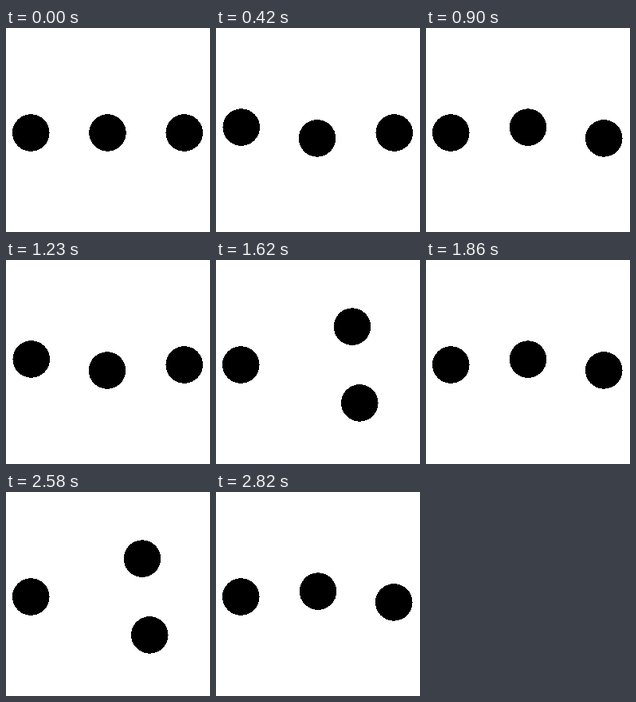
An HTML page that plays this animation: 256x256 px, repeating every 2850 ms.

```html
<!DOCTYPE html>
<html lang="en">
<head>
<meta charset="utf-8">
<title>Swapping dots</title>
<style>
  html, body { margin: 0; width: 100%; height: 100%; overflow: hidden; background: #fff; }
  svg { display: block; width: 100vw; height: 100vh; }
</style>
</head>
<body>
<svg viewBox="0 0 256 256" shape-rendering="crispEdges">
  <circle r="23.3"/>
  <circle r="23.3"/>
  <circle r="23.3"/>
</svg>
<script>
  const STEP = 30, LOOP = 2850, SWAP = 16;
  const MID = 127.5, CY = 131.5, GAP = 96.25, RADIUS = GAP / 2;
  const dots = document.querySelectorAll('circle');

  const bezier = (a, b, s) =>
    3 * (1 - s) * (1 - s) * s * a + 3 * (1 - s) * s * s * b + s * s * s;

  // Slow start, quick swing, then settle back from a small overshoot.
  function ease(u) {
    let lo = 0, hi = 1;
    for (let i = 0; i < 30; i++) {
      const s = (lo + hi) / 2;
      if (bezier(0.716, 0.075, s) < u) lo = s; else hi = s;
    }
    return bezier(0.25, 1.385, lo);
  }

  function place(dot, x, y) {
    dot.setAttribute('cx', x);
    dot.setAttribute('cy', y);
  }

  function draw(ms) {
    const tick = Math.floor((ms % LOOP) / STEP);
    const phase = tick % SWAP;
    const side = Math.floor(tick / SWAP) % 2 ? 1 : -1;
    const angle = phase ? Math.PI * ease(phase / SWAP) : 0;
    const cx = MID + side * RADIUS;
    const dx = RADIUS * Math.cos(angle), dy = RADIUS * Math.sin(angle);
    place(dots[0], cx - dx, CY - dy);
    place(dots[1], cx + dx, CY + dy);
    place(dots[2], MID - side * GAP, CY);
  }

  const start = performance.now();
  function frame() {
    draw(performance.now() - start);
    requestAnimationFrame(frame);
  }
  frame();
</script>
</body>
</html>
```
